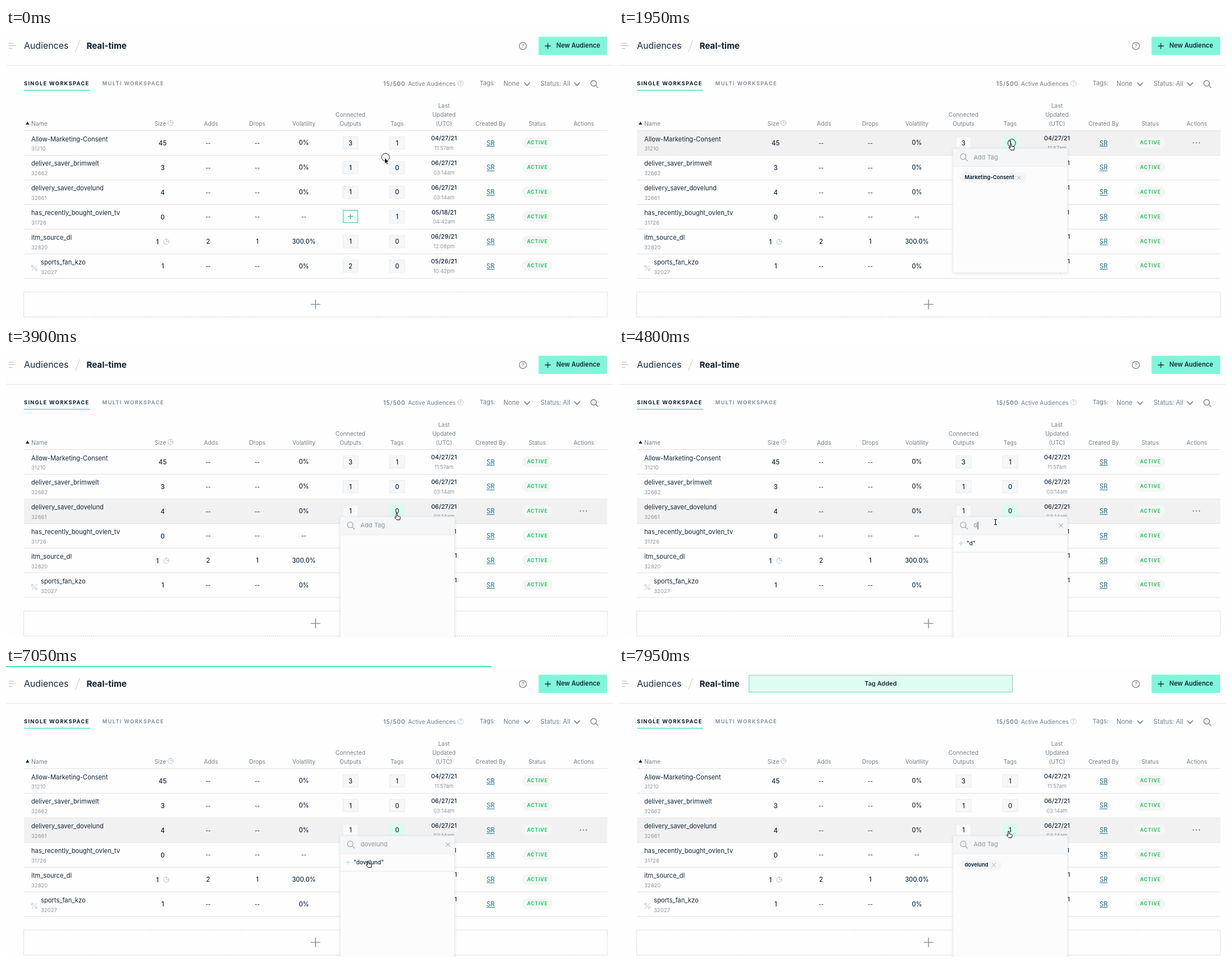
Write an HTML page that moves like this. It is 1081 by 518 pixels and loops after 8000 ms.

```html
<!DOCTYPE html>
<html lang="en">
<head>
<meta charset="utf-8">
<title>Audiences</title>
<style>
html, body { margin: 0; width: 100%; height: 100%; overflow: hidden; background: #fefefe; }
svg { display: block; width: 100%; height: 100%; font-family: Inter, "Open Sans", sans-serif; }
.panel { filter: drop-shadow(0 1px 2px rgba(30, 45, 60, .12)); }
</style>
</head>
<body>
<svg id="stage" viewBox="0 0 1081 518"></svg>
<script>
const LOOP = 8000, STEP = 150;
const NAVY = '#14293d', INK = '#0c1d2e', GREY = '#75808a', PALE = '#8d969e', FAINT = '#b7bdc2';
const RULE = '#dfe2e4', SOFT = '#f5f7f8', MINTED = '#d9fbf0', TEAL = '#52e0c8', GREEN = '#32c59b', LEAF = '#24c658';
const ROW_TOP = 183, ROW_H = 43.85;
const TAG = 'dovelund';

const stage = document.getElementById('stage');

function add(parent, name, attrs, text) {
  const node = document.createElementNS('http://www.w3.org/2000/svg', name);
  for (const key in attrs) node.setAttribute(key, attrs[key]);
  if (text !== undefined) node.textContent = text;
  parent.appendChild(node);
  return node;
}
const group = parent => add(parent, 'g', {});
const rect = (parent, x, y, width, height, fill, more) =>
  add(parent, 'rect', { x, y, width, height, fill, ...more });
const stroke = (parent, d, color, width = 1, more) =>
  add(parent, 'path', { d, fill: 'none', stroke: color, 'stroke-width': width, ...more });
const circle = (parent, cx, cy, r, color, width = 1) =>
  add(parent, 'circle', { cx, cy, r, fill: 'none', stroke: color, 'stroke-width': width });

// Text is placed by the middle of its capital height.
function label(parent, x, mid, text, size, fill = NAVY, more) {
  return add(parent, 'text', { x, y: mid + size * .36, 'font-size': size, fill, ...more }, text);
}
const centred = (parent, x, mid, text, size, fill, more) =>
  label(parent, x, mid, text, size, fill, { 'text-anchor': 'middle', ...more });

const plus = (parent, x, y, r, color, width) =>
  stroke(parent, `M${x - r} ${y}H${x + r}M${x} ${y - r}V${y + r}`, color, width);
const cross = (parent, x, y, r, color) =>
  stroke(parent, `M${x - r} ${y - r}L${x + r} ${y + r}M${x + r} ${y - r}L${x - r} ${y + r}`, color);
const chevron = (parent, x, y) =>
  stroke(parent, `M${x - 5} ${y - 2.5}L${x} ${y + 2.8}L${x + 5} ${y - 2.5}`, GREY, 1.8);
const lens = (parent, x, y, color) => {
  circle(parent, x, y, 5, color, 1.3);
  stroke(parent, `M${x + 3.6} ${y + 3.6}L${x + 8} ${y + 8}`, color, 1.3);
};
const help = (parent, x, y, r, size, color) => {
  circle(parent, x, y, r, color, r > 6 ? 1.2 : .8);
  centred(parent, x, y, '?', size, color, { 'font-weight': 500 });
};
const pie = (parent, x, y) => {
  circle(parent, x, y, 4.7, FAINT, .9);
  stroke(parent, `M${x} ${y - 4.7}V${y}H${x + 4.7}`, FAINT, .9);
};

function drawHeader() {
  stroke(stage, 'M5 27H14M5 31.5H17M5 36.5H11', '#b4babf', 1.2);
  label(stage, 32, 31.5, 'Audiences', 15.9);
  stroke(stage, 'M131.5 22L123.5 42', '#c3c8cc');
  label(stage, 143.5, 31.5, 'Real-time', 15.1, INK, { 'font-weight': 700 });
  help(stage, 920.5, 32, 6.4, 9, GREY);
  rect(stage, 948.5, 15.5, 122, 32.5, '#7ff6d9', { rx: 1.5 });
  plus(stage, 965, 32, 5.3, NAVY, 1.3);
  label(stage, 980, 31.5, 'New Audience', 11.1, NAVY, { 'font-weight': 600 });
  stroke(stage, 'M0 66.5H1081', '#e6e8ea');

  const tab = { 'font-weight': 700, 'letter-spacing': 1.3 };
  label(stage, 32, 98.3, 'SINGLE WORKSPACE', 9.3, INK, tab);
  label(stage, 171.5, 98.3, 'MULTI WORKSPACE', 9.3, PALE, tab);
  rect(stage, 32, 110, 118, 1.5, TEAL);
  label(stage, 672, 99, '15/500', 10, GREY, { 'font-weight': 600, 'letter-spacing': 1 });
  label(stage, 716, 99.5, 'Active Audiences', 10.3, GREY);
  help(stage, 809.5, 98.5, 4.9, 7, FAINT);
  label(stage, 843.5, 98.5, 'Tags:', 11, GREY);
  label(stage, 886, 98.5, 'None', 11.2, GREY);
  chevron(stage, 928, 99.5);
  label(stage, 952, 98.5, 'Status: All', 11.2, GREY);
  chevron(stage, 1017, 99.5);
  lens(stage, 1046.5, 98.5, GREY);
}

function drawHeadings() {
  const head = (x, y, text) => centred(stage, x, y, text, 10.3, GREY);
  add(stage, 'path', { d: 'M35 172L38.3 166.5L41.6 172Z', fill: NAVY });
  label(stage, 45, 169.8, 'Name', 10.4, GREY);
  label(stage, 264.5, 169.8, 'Size', 10.3, GREY);
  pie(stage, 293, 169);
  head(365, 169.8, 'Adds');
  head(447.5, 169.8, 'Drops');
  head(530.5, 169.8, 'Volatility');
  head(613.5, 154, 'Connected');
  head(613.5, 169.8, 'Outputs');
  head(696.5, 169.8, 'Tags');
  ['Last', 'Updated', '(UTC)'].forEach((s, i) => head(780, 138.3 + i * 15.8, s));
  head(863, 169.8, 'Created By');
  head(946, 169.8, 'Status');
  head(1029, 169.8, 'Actions');
}

function badge(parent, x, mid, value) {
  if (value === '+') {
    const box = rect(parent, x - 13, mid - 11.8, 26, 22, '#fefefe', { stroke: GREEN });
    plus(parent, x, mid - .8, 4.7, GREEN, 1.4);
    return { box };
  }
  const box = rect(parent, x - 13.5, mid - 11, 27, 22, SOFT, { stroke: '#e8ebed' });
  return { box, text: centred(parent, x, mid, value, 11.2, NAVY, { 'font-weight': 500 }) };
}

function drawRow(row, i) {
  const [name, id, size, adds, drops, vol, outputs, tags, date, time] = row;
  const y = ROW_TOP + i * ROW_H, mid = y + 22, last = i === 5;
  const hover = rect(stage, 32, y, 1039, ROW_H - .4, '#f1f1f1');
  const x = last ? 62 : 45;
  const num = { 'font-weight': 500 };
  const figure = (cx, text) =>
    centred(stage, cx, mid - .5, text, text === '--' ? 9.5 : 11.1, NAVY, num);
  label(stage, x, y + 14.5, name, 11.2);
  label(stage, x, y + 32, id, 9.5, PALE);
  if (last) {
    stroke(stage, `M46 ${y + 30}L55 ${y + 20}`, FAINT);
    circle(stage, 47.2, y + 22, 1.8, FAINT);
    circle(stage, 53.6, y + 28, 1.8, FAINT);
  }
  const busy = i === 4;
  centred(stage, busy ? 269.5 : 279, mid, size, 11.4, NAVY, num);
  if (busy) pie(stage, 285.5, mid);
  figure(360, adds);
  figure(447.5, drops);
  figure(530.5, vol);
  const out = badge(stage, 613.5, mid - .3, outputs);
  const tag = badge(stage, 696.5, mid - .3, tags);
  centred(stage, 780, y + 13.2, date, 10.8, NAVY, num);
  centred(stage, 780, y + 30.5, time, 9.3, PALE);
  centred(stage, 863, mid - .5, 'SR', 11.2, '#1c7088');
  stroke(stage, `M856 ${mid + 5.5}H870`, '#1c7088');
  rect(stage, 919, mid - 10.5, 54, 19.5, '#f4f6f6', { rx: 9.75 });
  centred(stage, 946.5, mid - .8, 'ACTIVE', 8.3, LEAF, { 'font-weight': 700, 'letter-spacing': 1 });
  const dots = group(stage);
  [1023, 1028.3, 1033.6].forEach(cx => add(dots, 'circle', { cx, cy: mid - .8, r: 1.3, fill: PALE }));
  stroke(stage, `M32 ${y + ROW_H - .3}H1071`, RULE);
  return { hover, out, tag, dots };
}

function drawFooter() {
  rect(stage, 31.5, 470, 1039.5, 44.5, 'none', { stroke: '#c9ced2', 'stroke-dasharray': '2 1.6' });
  plus(stage, 551.3, 492, 8.5, PALE, 1.7);
}

function drawChip(parent, text, width) {
  const chip = group(parent);
  rect(chip, 606, 257, width, 18.8, '#f3f5f7', { rx: 9.4 });
  label(chip, 615.5, 265.8, text, 9.4, INK, { 'font-weight': 600 });
  cross(chip, 606 + width - 13, 266.7, 3.4, '#a3abb2');
  return chip;
}

// Drawn for the first row and shifted down for the others.
function drawPanel() {
  const root = add(stage, 'g', { class: 'panel' });
  rect(root, 595, 214.5, 204, 221.5, '#fcfcfc', { stroke: '#e4e7ea', rx: 1.5 });
  rect(root, 595.5, 215, 203, 31, '#f5f6f7');
  stroke(root, 'M595 246.5H799', '#e8eaed');
  lens(root, 613, 229, '#a3abb2');
  const input = label(root, 631.5, 229.7, 'Add Tag', 11, PALE);
  const caret = rect(root, 0, 223, .9, 14, NAVY);
  const clear = group(root);
  cross(clear, 787, 230, 3.6, PALE);
  const item = group(root);
  plus(item, 609, 262, 3.8, '#8fe3cf', 1);
  const itemText = label(item, 619, 262, '', 10, NAVY, { 'font-weight': 500 });
  stroke(item, 'M595 277.5H799', '#e4e7ea');
  const chips = [drawChip(root, 'Marketing-Consent', 119), drawChip(root, TAG, 74.5)];
  return { root, input, caret, clear, item, itemText, chips };
}

function drawToast() {
  const toast = group(stage);
  rect(toast, 231.5, 16.5, 469, 30, '#ddfdf2', { stroke: '#72dfc1' });
  centred(toast, 466, 31.5, 'Tag Added', 11, NAVY, { 'font-weight': 600 });
  return toast;
}

function drawPointer() {
  const root = group(stage);
  return {
    root,
    ring: circle(root, 1.4, -.9, 6.9, '#1b1b1b', 1),
    arrow: add(root, 'path', { d: 'M0 0V10.4L2.4 8.3L4 11.8L5.7 11L4.2 7.6H7.4Z',
      fill: '#000', stroke: '#fff', 'stroke-width': .7 }),
    hand: add(root, 'path', { d: 'M-1.1 1c0-1.4 2.2-1.4 2.2 0v3.8l3.7.8c1.2.3 1.5 1 1.3 2l-.7 4H0L-3.6 7.6c-.6-1 .6-1.8 1.4-1.1L-1.1 7.5Z',
      fill: '#fff', stroke: '#000', 'stroke-linejoin': 'round' }),
    beam: stroke(root, 'M-2.5-4.8Q0-4.8 0-3.3Q0-4.8 2.5-4.8M0-3.5V3.5M-2.5 4.8Q0 4.8 0 3.3Q0 4.8 2.5 4.8', '#000', 1.1)
  };
}

const rows = [
  ['Allow-Marketing-Consent', '31210', '45', '--', '--', '0%', '3', '1', '04/27/21', '11:57am'],
  ['deliver_saver_brimwelt', '32662', '3', '--', '--', '0%', '1', '0', '06/27/21', '03:14am'],
  ['delivery_saver_' + TAG, '32661', '4', '--', '--', '0%', '1', '0', '06/27/21', '03:14am'],
  ['has_recently_bought_ovlen_tv', '31726', '0', '--', '--', '--', '+', '1', '05/18/21', '04:42am'],
  ['itm_source_dl', '32820', '1', '2', '1', '300.0%', '1', '0', '06/29/21', '12:08pm'],
  ['sports_fan_kzo', '32027', '1', '--', '--', '0%', '2', '0', '05/26/21', '10:42pm']
];

drawHeader();
drawHeadings();
stroke(stage, 'M32 182.5H1071', RULE);
const table = rows.map(drawRow);
drawFooter();
const panel = drawPanel();
const toast = drawToast();
const bar = rect(stage, 0, 0, 0, 2, TEAL);
const pointer = drawPointer();

// Pointer stops: [time, x, y].
const PATH = [[0, 674.5, 231], [150, 676, 229], [1050, 698, 205.7], [2250, 698, 205.7], [3150, 704.5, 281.5],
  [3300, 699, 293], [3450, 696, 296], [3900, 696, 296], [4350, 670.5, 311.5],
  [6300, 670.5, 311.5], [6750, 645, 347], [7050, 645, 347], [7350, 701, 314], [7650, 694, 297], [7950, 694, 294]];
// Value lists: [time, value], held until the next time.
const SHAPE = [[0, 'arrow'], [900, 'hand'], [2400, 'arrow'], [2700, 'hand'], [3000, 'arrow'], [3300, 'hand'],
  [4200, 'beam'], [6600, 'hand'], [7200, 'beam'], [7500, 'hand']];
const RING = [[0, 1], [150, 0], [1200, 1], [1500, 0], [1950, 1], [2100, 0], [3600, 1], [3900, 0], [6900, 1], [7050, 0]];
const HOVER = [[0, -1], [450, 0], [2550, 1], [3300, 2]];
const MINT = [[0, -1], [750, 0], [2400, -1], [2700, 1], [3000, -1], [3450, 2]];
const OPEN = [[0, 0], [1200, .4], [1350, .8], [1500, 1], [2100, 0], [3600, .4], [3750, .8], [3900, 1]];
const TYPED = [[0, 0], [4800, 1], [5100, 2], [5400, 3], [5550, 4], [5700, 6], [5850, 8], [7350, 0]];
const LOADED = [[0, 0], [6900, .4], [7050, .8], [7200, 1], [7500, 0]];
const NOTICE = [[0, 0], [7350, .07], [7500, .5], [7650, .85], [7800, 1]];

function held(list, t) {
  let value;
  for (const [time, v] of list) if (time <= t) value = v;
  return value;
}
function along(path, t) {
  const i = path.findIndex(p => p[0] > t);
  if (i < 0) return path[path.length - 1].slice(1);
  const [t0, x0, y0] = path[i - 1], [t1, x1, y1] = path[i];
  const u = (t - t0) / (t1 - t0), k = u * u * (3 - 2 * u);
  return [x0 + (x1 - x0) * k, y0 + (y1 - y0) * k];
}
const show = (node, on) => node.setAttribute('visibility', on ? 'inherit' : 'hidden');

function draw(time) {
  const t = Math.floor(time / STEP) * STEP;
  const hover = held(HOVER, t), mint = held(MINT, t), saved = t >= 7350;

  table.forEach((row, i) => {
    const on = i === hover, plain = on ? '#f8f9f9' : SOFT;
    show(row.hover, on);
    show(row.dots, on);
    if (row.out.text) row.out.box.setAttribute('fill', plain);
    row.tag.box.setAttribute('fill', i === mint ? MINTED : plain);
    row.tag.box.setAttribute('stroke', i === mint ? MINTED : '#e8ebed');
  });
  table[2].tag.text.textContent = saved ? '1' : '0';

  const second = t >= 3000, typed = TAG.slice(0, held(TYPED, t));
  panel.root.setAttribute('opacity', held(OPEN, t));
  panel.root.setAttribute('transform', `translate(0 ${second ? 2 * ROW_H : 0})`);
  panel.input.textContent = typed || 'Add Tag';
  panel.itemText.textContent = `"${typed}"`;
  show(panel.clear, typed);
  show(panel.item, typed);
  show(panel.caret, t >= 4500 && t < 5100);
  panel.caret.setAttribute('x', typed ? 632 + panel.input.getComputedTextLength() : 631);
  show(panel.chips[0], !second);
  show(panel.chips[1], saved);

  bar.setAttribute('width', 1081 * held(LOADED, t));
  toast.setAttribute('opacity', held(NOTICE, t));

  const [x, y] = along(PATH, t), shape = held(SHAPE, t);
  pointer.root.setAttribute('transform', `translate(${x} ${y})`);
  for (const name of ['arrow', 'hand', 'beam']) show(pointer[name], name === shape);
  show(pointer.ring, held(RING, t));
}

const start = performance.now();
function tick() {
  draw((performance.now() - start) % LOOP);
  requestAnimationFrame(tick);
}
tick();
</script>
</body>
</html>
```
